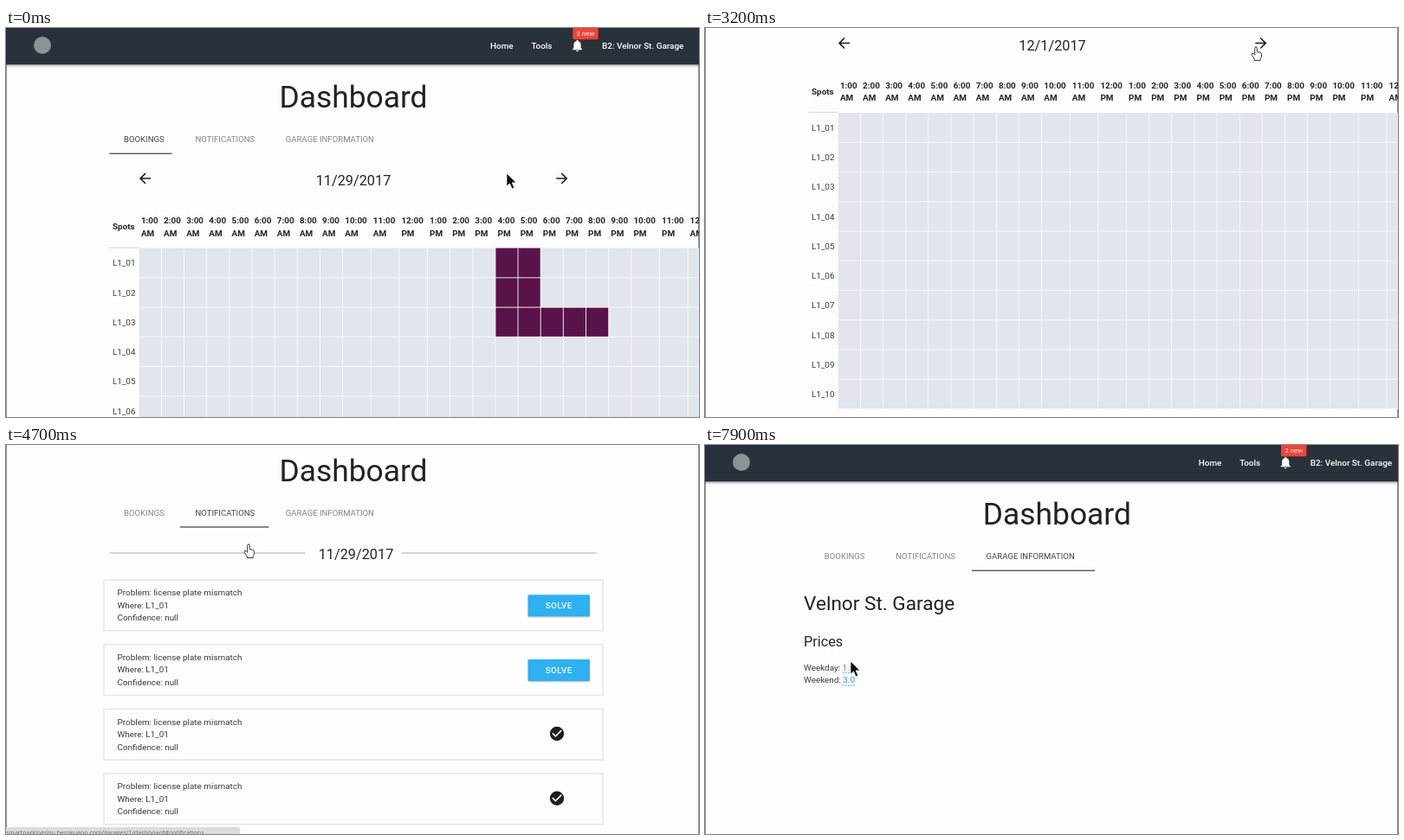
Recreate the animation shown at these times as an HTML page. Size 800 by 450 pixels, loop 8 s.

```html
<!DOCTYPE html>
<html lang="en">
<head>
<meta charset="utf-8">
<title>Dashboard</title>
<style>
  html, body { margin: 0; width: 100%; height: 100%; overflow: hidden; background: #fdfdfe; }
  svg { display: block; width: 800px; height: 450px; font: 9.92px Roboto, sans-serif; fill: #3a3a3a; }
  .nav { fill: #fff; font-weight: 500; }
  .head { font-weight: 700; fill: #252525; }
  .tab { font-size: 9.57px; }
  .h5 { font-size: 16.27px; fill: #262626; }
  .mid { text-anchor: middle; }
  .link { fill: #2a9fd0; }
</style>
</head>
<body>
<svg id="stage" viewBox="0 0 800 450"></svg>
<script>
const LOOP = 8000, STEP = 100;
const LEFT = 153.3, TOP = 254.6, ROW = 34.25, ROWS = 10;
const TAB_CLICK = 4400, INFO_CLICK = 5500;

const text = (x, y, s, cls = '', extra = '') => `<text x="${x}" y="${y}" class="${cls}" ${extra}>${s}</text>`;
const rect = (x, y, w, h, fill, extra = '') => `<rect x="${x}" y="${y}" width="${w}" height="${h}" fill="${fill}" ${extra}/>`;
const line = (x1, y1, x2, y2, color, width = .9) =>
  `<path d="M${x1} ${y1}L${x2} ${y2}" stroke="${color}" stroke-width="${width}"/>`;
const icon = (cx, cy, d, scale = .82, fill = '#1e1e1e') =>
  `<path transform="translate(${cx} ${cy}) scale(${scale}) translate(-12 -12)" fill="${fill}" d="${d}"/>`;

const BELL = 'M12 22a2 2 0 0 0 2-2h-4a2 2 0 0 0 2 2zm6-6v-5q0-5-4.5-6.3V4a1.5 1.5 0 0 0-3 0v.7Q6 6 6 11v5l-2 2v1h16v-1z';
const BACK = 'M20 11H7.8l5.6-5.6L12 4l-8 8 8 8 1.4-1.4L7.8 13H20z';
const NEXT = 'M4 11h12.2l-5.6-5.6L12 4l8 8-8 8-1.4-1.4 5.6-5.6H4z';
const CHECK = 'M12 2a10 10 0 1 0 0 20 10 10 0 0 0 0-20zm-2 15l-5-5 1.4-1.4 3.6 3.6 7.6-7.6L19 8z';

function navbar() {
  return rect(0, 42, 800, 4, 'url(#shade)') + rect(0, 0, 800, 42.3, '#29313a') +
    '<circle cx="42" cy="20" r="10" fill="#8b9298"/>' +
    '<g id="menu" class="nav">' + text(559, 23.8, 'Home') + text(606.5, 23.8, 'Tools') +
    icon(659.5, 20.4, BELL, .69, '#fff') + rect(654.3, -2, 29.4, 15.2, '#f44336', 'rx="1.4"') +
    text(669, 9, '2 new', 'mid', 'font-size="7.9" font-weight="400"') +
    text(688, 23.8, 'B2: Velnor St. Garage') + '</g>';
}

function bookings() {
  const bottom = TOP + ROWS * ROW;
  let labels = text(123, 233, 'Spots', 'head'), grid = '';
  for (let i = 1, x = LEFT; i <= 24; i++) {
    const hour = (i - 1) % 12 + 1;
    labels += text(x + 2.6, 226.2, hour + ':00', 'head') +
      text(x + 2.6, 240.6, i % 24 < 12 ? 'AM' : 'PM', 'head');
    grid += line(x, TOP, x, bottom, '#f8fafc');
    x += hour > 9 ? 32.6 : 26.15;
  }
  for (let r = 0; r < ROWS; r++) {
    const y = TOP + r * ROW;
    labels += text(123, y + 20.8, 'L1_' + String(r + 1).padStart(2, '0'));
    grid += line(LEFT, y + ROW, 800, y + ROW, '#f8fafc');
  }
  return icon(160.5, 174, BACK) + icon(641.8, 174, NEXT) + text(401, 182, '', 'h5 mid', 'id="date"') +
    line(119.5, 254.2, LEFT, 254.2, '#d2d2d2') + rect(LEFT, TOP, 647, ROWS * ROW, '#e1e6ec') +
    '<g id="booked">' + rect(565, TOP, 52, 2 * ROW, '#59124a') +
    rect(565, TOP + 2 * ROW, 131, ROW, '#59124a') + '</g>' + grid + labels;
}

function notifications() {
  let out = line(119.5, 175.4, 345.5, 175.4, '#a2a2a2') + line(456.5, 175.4, 682, 175.4, '#a2a2a2') +
    text(404, 182.2, '11/29/2017', 'h5 mid');
  for (let i = 0; i < 4; i++) {
    const y = 206.4 + i * 74.7;
    out += rect(112.9, y, 576.2, 58.8, 'none', 'stroke="#e3e7eb" stroke-width="1.5"');
    ['Problem: license plate mismatch', 'Where: L1_01', 'Confidence: null'].forEach(
      (s, k) => out += text(128.5, y + 18.4 + k * 14.4, s));
    out += i < 2
      ? rect(602.5, y + 18.6, 71.5, 25, '#00000038', 'rx="1.4"') +
        rect(602.5, y + 17.3, 71.5, 25, '#2cb1f3', 'rx="1.4"') +
        text(638.2, y + 33, 'SOLVE', 'nav mid', 'letter-spacing=".34"')
      : icon(636, y + 28.6, CHECK);
  }
  return out;
}

function information() {
  const price = (y, day, value) => text(114, y, `${day}: <tspan class="link">${value}</tspan>`) +
    `<path d="M158.6 ${y + 3}h14.4" stroke="#2a9fd0" stroke-width=".8" stroke-dasharray="2 1.2"/>`;
  return text(114, 191.2, 'Velnor St. Garage', '', 'font-size="22.6" fill="#222"') +
    text(114, 233, 'Prices', 'h5') + price(260.7, 'Weekday', '1.5') + price(275, 'Weekend', '3.0');
}

const stage = document.getElementById('stage');
stage.innerHTML =
  `<defs><linearGradient id="shade" x2="0" y2="1"><stop stop-opacity=".3"/><stop offset="1" stop-opacity="0"/></linearGradient></defs>
  <path d="M.5 0V450M799.5 0V450" stroke="#8c8c8c"/>
  <g id="page">${navbar()}
    ${text(401, 92.2, 'Dashboard', 'mid', 'id="title" font-size="35.4" fill="#222"')}
    <g id="tabs">${text(136, 132.2, 'BOOKINGS', 'tab')}${text(218.5, 132.2, 'NOTIFICATIONS', 'tab')}
      ${text(322.8, 132.2, 'GARAGE INFORMATION', 'tab')}${rect(0, 144.6, 0, 1.4, '#466060', 'id="bar"')}</g>
    <g class="view">${bookings()}</g><g class="view">${notifications()}</g><g class="view">${information()}</g>
  </g>
  <g id="status">${rect(-2, 442, 272, 10, '#dcdcdc', 'rx="2"')}
    ${text(0, 451, 'smartparkingsjsu.herokuapp.com/garages/1/dashboard#notifications', '',
      'style="font:7.05px \'Open Sans\',sans-serif" fill="#666"')}</g>
  <path id="arrow" d="M0 0V15.2L3.5 11.9 6.1 18 8.8 16.8 6.2 10.9H11Z" fill="#050505" stroke="#fff" stroke-width=".8"/>
  <path id="hand" d="M-1.3 8.5V1.2a1.3 1.3 0 0 1 2.6 0V5.6l3.4.7q2 .4 2 2.4 0 3-1.5 5v1.8H-1.6V14L-4.7 9.3q-.8-1.5.5-2 1.2-.2 2.9 1.9z" fill="#fff" stroke="#222" stroke-width=".9"/>`;

const $ = id => document.getElementById(id);
const views = [...document.querySelectorAll('.view')], tabs = [...document.querySelectorAll('.tab')];
const show = (el, on) => el.setAttribute('visibility', on ? 'visible' : 'hidden');
const move = (el, x, y = 0) => el.setAttribute('transform', `translate(${x} ${y})`);
const within = (t, a, b) => t >= a && t < b;

// Eased moves from a first value: each is [begin, end, ...new values].
function glide(t, first, ...moves) {
  return moves.reduce((from, [begin, end, ...to]) => {
    const p = Math.min(1, Math.max(0, (t - begin) / (end - begin))), e = p * p * (3 - 2 * p);
    return from.map((v, i) => v + (to[i] - v) * e);
  }, first);
}

const pointer = t => glide(t, [578, 168],
  [500, 700, 682, 171], [1500, 1800, 639, 37], [1800, 2000, 636, 22],  // to the next-day arrow
  [3200, 3600, 400, 60], [3600, 4100, 253, 135],                       // to the notifications tab
  [4400, 4700, 280, 115], [4900, 5300, 372, 72],                       // to the information tab
  [5500, 5900, 372, 35], [6100, 6300, 355, 30],
  [6400, 7300, 198, 260], [7300, 7700, 165, 251], [7800, 7900, 168, 250]);  // to the prices

const scrollTop = t => glide(t, [0],
  [1000, 1400, 156.5], [3300, 3987, 0], [4400, 4700, 50.4], [5400, INFO_CLICK, 0])[0];

function draw(t) {
  const view = t < TAB_CLICK ? 0 : t < INFO_CLICK ? 1 : 2, wide = view === 2;
  move($('page'), 0, -scrollTop(t));
  move($('menu'), wide ? 10.7 : 0);
  move($('title'), wide ? 5.4 : 0);
  move($('tabs'), wide ? 1.8 : 0);
  views.forEach((v, i) => show(v, i === view));

  const onTab = within(t, 4000, 4900) ? 1 : within(t, 5200, 5600) ? 2 : 0;
  tabs.forEach((tab, i) => tab.setAttribute('fill', i === view ? '#444' : i && i === onTab ? '#555' : '#858585'));
  const [left, right] = glide(t, [119.5, 191.5], [4300, 4600, 201, 303.5], [5400, 5800, 306.2, 448.2]);
  $('bar').setAttribute('x', left);
  $('bar').setAttribute('width', right - left);

  $('date').textContent = t < 2200 ? '11/29/2017' : t < 3200 ? '11/30/2017' : '12/1/2017';
  $('booked').style.display = t < 2200 ? '' : 'none';
  $('status').setAttribute('opacity', glide(t, [0], [4100, 4400, 1], [5500, 5700, 0])[0]);

  const hand = onTab > 0 || within(t, 2000, 3300) || within(t, 7600, 7900);
  show($('hand'), hand);
  show($('arrow'), !hand);
  move($('hand'), ...pointer(t));
  move($('arrow'), ...pointer(t));
}

function tick() {
  draw(Math.floor(performance.now() % LOOP / STEP) * STEP);
  requestAnimationFrame(tick);
}
tick();
</script>
</body>
</html>
```
